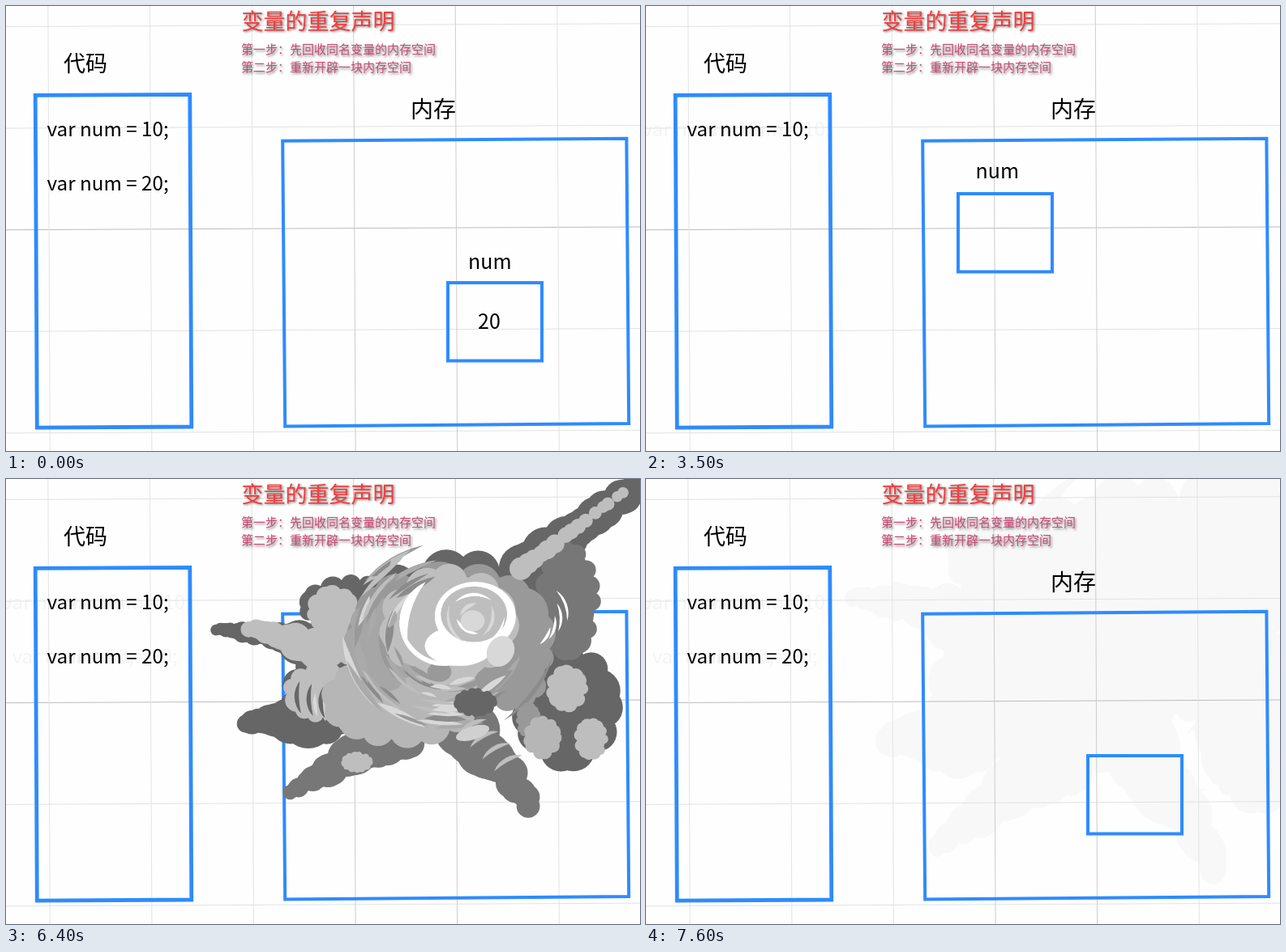
Animation, 782 px wide and 550 px high, one loop 8 s. Source, as an HTML page with a canvas:

```html
<!DOCTYPE html>
<html lang="zh">
<head>
<meta charset="utf-8">
<title>变量的重复声明</title>
<style>
html, body { margin: 0; width: 100%; height: 100%; overflow: hidden; background: #fefefe; }
canvas { display: block; }
</style>
</head>
<body>
<canvas id="stage" width="782" height="550"></canvas>
<script>
const ctx = document.getElementById('stage').getContext('2d');
const LOOP = 8000, STEP = 100, TAU = Math.PI * 2;
const FONT = '"Noto Sans CJK SC", "Noto Sans CJK", "Noto Sans", sans-serif';
const BLUE = '#2e8bff';
const DARK = '#666666', SHADE = '#777777', MID = '#999999', LIGHT = '#bebebe', PALE = '#d8d8d8', WHITE = '#ffffff';
let tint = null; // overrides fill colours when drawing a silhouette

const easeOut = p => 1 - (1 - p) ** 3;
const clamp = p => Math.max(0, Math.min(1, p));
const mix = (a, b, p) => a + (b - a) * p;

function seeded(seed) {
  return () => {
    seed = (seed * 16807) % 2147483647;
    return seed / 2147483647;
  };
}

function text(str, x, y, size, color = '#000') {
  ctx.font = `${size}px ${FONT}`;
  ctx.fillStyle = color;
  ctx.fillText(str, x, y);
}

function line(x1, y1, x2, y2, color) {
  ctx.strokeStyle = color;
  ctx.lineWidth = 1;
  ctx.beginPath();
  ctx.moveTo(x1, y1);
  ctx.lineTo(x2, y2);
  ctx.stroke();
}

function frame(corners, width) {
  ctx.beginPath();
  for (const [x, y] of corners) ctx.lineTo(x, y);
  ctx.closePath();
  ctx.strokeStyle = BLUE;
  ctx.lineWidth = width;
  ctx.stroke();
}

function around(x, y, sx, sy, draw) {
  ctx.save();
  ctx.translate(x, y);
  ctx.scale(sx, sy);
  ctx.translate(-x, -y);
  draw();
  ctx.restore();
}

function oval(color, x, y, rx, ry = rx, turn = 0) {
  ctx.beginPath();
  ctx.ellipse(x, y, rx, ry, turn, 0, TAU);
  ctx.fillStyle = tint || color;
  ctx.fill();
}

// Ellipse with a scalloped rim
function puff(color, x, y, rx, ry, seed = 7) {
  const rnd = seeded(seed * 991), size = Math.min(rx, ry) * .36;
  const n = Math.round((rx + ry) / size * 1.9);
  oval(color, x, y, rx - size * .5, ry - size * .5);
  for (let i = 0; i < n; i++) {
    const a = (i + rnd() * .5) / n * TAU, r = size * (.75 + rnd() * .35);
    oval(color, x + Math.cos(a) * (rx - r), y + Math.sin(a) * (ry - r), r);
  }
}

// Knobbly limb that widens from its tip to its root
function limb(color, x0, y0, r0, x1, y1, r1, seed = 3) {
  const rnd = seeded(seed * 733), n = 14;
  for (let i = 0; i <= n; i++) {
    const p = i / n, r = mix(r0, r1, p), sway = (rnd() - .5) * r * .45;
    oval(color, mix(x0, x1, p) + sway, mix(y0, y1, p) - sway, r * (.88 + rnd() * .2));
  }
}

// Tapered sliver along the outside of a circle
function crescent(color, x, y, r, from, to, thick) {
  const mid = (from + to) / 2, k = r / Math.cos((to - from) / 2) - thick * 2;
  ctx.beginPath();
  ctx.arc(x, y, r, from, to);
  ctx.quadraticCurveTo(x + Math.cos(mid) * k, y + Math.sin(mid) * k,
    x + Math.cos(from) * r, y + Math.sin(from) * r);
  ctx.fillStyle = tint || color;
  ctx.fill();
}

function cloudArms() {
  limb(DARK, 238, 152, 9, 300, 160, 15);
  limb(DARK, 300, 158, 15, 400, 180, 34);
  limb(DARK, 284, 292, 15, 390, 286, 40, 5);
  limb(DARK, 880, -70, 22, 700, 60, 36, 8);
  limb(SHADE, 350, 396, 11, 440, 344, 30, 4);
  limb(SHADE, 440, 340, 28, 528, 326, 20, 6);
  limb(SHADE, 709, 416, 17, 610, 300, 42, 9);
  puff(DARK, 395, 255, 62, 72);
  puff(DARK, 440, 118, 80, 48, 4);
  puff(DARK, 600, 142, 165, 110, 2);
  puff(DARK, 764, 270, 84, 98, 5);
  puff(SHADE, 765, 110, 50, 90, 6);
}

function cloudBody() {
  limb(LIGHT, 288, 150, 13, 400, 184, 28);
  puff(LIGHT, 412, 124, 40, 38, 3);
  puff(LIGHT, 430, 172, 48, 34, 5);
  puff(LIGHT, 398, 248, 62, 46, 8);
  for (let i = 0; i < 5; i++) {
    crescent(DARK, 392 + i * 18, 254 + i * 4, 38, 2.4, 3.8, 8);
    crescent(PALE, 416 + i * 12, 264 + i * 7, 34, 2.5, 3.6, 6);
  }
  puff(MID, 590, 158, 157, 108, 4);
  puff(MID, 682, 195, 62, 82, 6);
  puff('#b6b6b6', 515, 260, 122, 72, 9);
  puff('#a6a6a6', 486, 176, 58, 72, 3);
  puff(LIGHT, 586, 146, 106, 92, 5);
}

function swirls() {
  const rnd = seeded(4242), shades = ['#8c8c8c', PALE, '#aaaaaa', MID, LIGHT];
  around(585, 165, 1, .92, () => {
    for (let i = 0; i < 60; i++) {
      const a = mix(.1, 3.9, rnd()), span = .25 + rnd() * .55;
      crescent(shades[i % 5], 585, 165, mix(160, 72, i / 60), a, a + span, 5 + rnd() * 8);
    }
  });
  oval(MID, 572, 217, 18, 15);
  puff(DARK, 626, 263, 33, 22);
}

function cloudCore() {
  crescent(WHITE, 578, 142, 66, 1.1, 3.2, 24);
  crescent(WHITE, 578, 142, 66, 2.5, 4.3, 22);
  oval(WHITE, 626, 133, 61, 52);
  oval(WHITE, 602, 178, 52, 30);
  oval(LIGHT, 624, 130, 50, 42);
  for (let i = 0; i < 6; i++) {
    const a = i * 1.9;
    crescent(i % 2 ? PALE : WHITE, 624, 134, 46 - i * 5, a, a + 1.7, 8);
  }
  oval(PALE, 622, 140, 18, 16);
  oval(PALE, 664, 186, 20, 24, .5);
}

function cloudLights() {
  limb(LIGHT, 850, -55, 8, 692, 64, 16, 2);
  for (let i = 0; i < 4; i++) {
    crescent(WHITE, 726 - i * 4, 128 + i * 8, 40 - i * 5, -1 + i * .3, .3 + i * .3, 5);
    crescent(LIGHT, 690 - i * 18, 380 - i * 18, 38, 3.5, 4.9, 8);
  }
  puff(LIGHT, 764, 242, 32, 36, 3);
  puff(MID, 706, 290, 19, 27, 4);
  puff('#b6b6b6', 727, 316, 29, 33, 5);
  puff(LIGHT, 800, 318, 26, 32, 6);
  puff(LIGHT, 448, 353, 24, 16, 7);
  oval('#d0d0d0', 622, 309, 26, 10, -.3);
}

function cloud() {
  cloudArms();
  cloudBody();
  swirls();
  cloudLights();
  cloudCore();
}

// The cloud swells out of the first memory cell
const swell = (sx, sy = sx) => around(364, 336, sx, sy, cloud);

function flames() {
  ctx.fillStyle = '#eeeeee';
  for (let i = 0; i < 4; i++) {
    const x = 384 + i * 29, y = 240 - i * 3;
    ctx.beginPath();
    ctx.moveTo(x, y);
    ctx.quadraticCurveTo(x - 6, y - 22, x + 9, y - 48);
    ctx.quadraticCurveTo(x + 5, y - 25, x + 20, y);
    ctx.fill();
  }
}

function burst() {
  const cx = 555, cy = 204;
  puff(MID, 512, 214, 52, 49, 3);
  puff(MID, 598, 204, 54, 55, 5);
  puff('#b0b0b0', 562, 184, 72, 36, 4);
  puff('#8c8c8c', 505, 190, 24, 19);
  puff(PALE, 540, 213, 48, 18, 6);
  ctx.fillStyle = '#eeeeee';
  for (let i = 0; i < 12; i++) {
    const a = .7 + i * TAU / 12, far = i % 3 ? 92 : 128;
    ctx.beginPath();
    for (const [turn, r] of [[-1.57, 6], [0, far], [1.57, 6]]) {
      ctx.lineTo(cx + Math.cos(a + turn) * r, cy + Math.sin(a + turn) * r);
    }
    ctx.fill();
  }
  oval('#eeeeee', cx, cy - 4, 13, 17);
}

function streak() {
  ctx.fillStyle = '#fafafa';
  ctx.fillRect(205, 185, 157, 14);
  ctx.fillRect(405, 190, 56, 13);
}

function haze() {
  tint = '#f8f8f8';
  around(580, 180, .95, 1.25, cloud);
  tint = null;
}

function blast(t) {
  if (t >= 7200) return;
  if (t >= 6900) {
    swell(mix(.7, 1, (t - 6900) / 200));
  } else if (t >= 6700) {
    const s = t < 6800 ? 1 : 1.6;
    if (t < 6800) streak();
    around(555, 205, s, s, burst);
  } else if (t >= 6200) {
    const p = (t - 6200) / 400;
    ctx.globalAlpha = t < 6600 ? 1 : .5;
    swell(mix(.6, 1.04, p));
    ctx.globalAlpha = 1;
  } else if (t >= 5900) {
    const s = t < 6000 ? .6 : 1;
    around(428, 282, s, s, () => {
      flames();
      swell(.357, .385);
    });
  }
}

function bounceIn(p) {
  const keys = [[0, -3000], [.6, 25], [.75, -10], [.9, 5], [1, 0]];
  const i = Math.max(1, keys.findIndex(key => p <= key[0]));
  const [t0, a] = keys[i - 1], [t1, b] = keys[i];
  return mix(a, b, easeOut((p - t0) / (t1 - t0)));
}

function slideText(t, start, side, str, x, y, size) {
  if (t <= start) return;
  text(str, x + side * bounceIn(clamp((t - start) / 700)), y, size);
}

function zoomIn(t, start, x, y, draw) {
  const p = clamp((t - start) / 500);
  if (!p) return;
  const s = mix(.3, 1, 1 - (1 - p) ** 2);
  ctx.globalAlpha = Math.min(1, p * 2);
  around(x, y, s, s, draw);
  ctx.globalAlpha = 1;
}

function cell(x, y) {
  ctx.strokeStyle = BLUE;
  ctx.lineWidth = 4;
  ctx.strokeRect(x, y, 116, 96.5);
}

function grid() {
  for (let i = 0; i < 5; i++) {
    const y = 25.5 + i * 125.6;
    line(0, y, 782, y - 3.7, i === 2 ? '#bcbcbc' : '#e2e2e2');
  }
  for (let i = 0; i < 6; i++) {
    const x = 51.8 + i * 125.6;
    line(x, 0, x + 2.5, 550, i === 3 || i === 4 ? '#cccccc' : '#e4e4e4');
  }
}

function headings() {
  ctx.shadowColor = 'rgba(0,0,0,.5)';
  ctx.shadowBlur = 3;
  ctx.shadowOffsetX = ctx.shadowOffsetY = 1.5;
  text('变量的重复声明', 290.5, 28.7, 27, '#f23c3c');
  text('第一步：先回收同名变量的内存空间', 290, 59, 15, '#cb4a78');
  text('第二步：重新开辟一块内存空间', 290, 81, 15, '#cb4a78');
  ctx.shadowColor = 'transparent';
}

function board() {
  grid();
  text('代码', 71, 81, 27);
  text('内存', 499, 137.5, 28);
  frame([[36.2, 110.3], [226.8, 109.4], [228.8, 520], [38.3, 521.2]], 4.8);
  frame([[341.2, 166.8], [765.4, 163.7], [768.2, 516], [344.2, 519.4]], 4);
}

// Pale after-image left where the sliding code bounced
function trail(str, y, ...shifts) {
  for (const dx of shifts) text(str, 50.5 + dx, y, 24.2, '#f4f4f4');
}

function render(t) {
  const codeA = ['var num = 10;', 50.5, 161, 24.2];
  const codeB = ['var num = 20;', 50.5, 228, 24.2];
  ctx.fillStyle = '#fefefe';
  ctx.fillRect(0, 0, 782, 550);
  if (t >= 6700) haze();
  if (t >= 2000) trail(codeA[0], 161, -55, 27);
  if (t >= 5700) trail(codeB[0], 228, -43, 11);
  board();

  if (t < 1200) {
    text(...codeA);
    text(...codeB);
    text('num', 570, 325, 25);
    cell(545, 342);
    text('20', 582, 398.5, 25);
  } else {
    slideText(t, 1300, 1, ...codeA);
    slideText(t, 5000, 1, ...codeB);
    const label = () => slideText(t, 1900, -1, 'num', 406.5, 212.5, 25);
    if (t < 6200) {
      zoomIn(t, 3000, 443, 280, () => cell(385, 232));
      blast(t);
      label();
      zoomIn(t, 3900, 426, 273, () => text('10', 411.5, 281.5, 25));
    } else {
      if (t < 6800) label();
      blast(t);
      zoomIn(t, 7100, 603, 390, () => cell(545, 342));
    }
  }
  headings();
}

function tick(now) {
  render(Math.floor(now % LOOP / STEP) * STEP);
  requestAnimationFrame(tick);
}
requestAnimationFrame(tick);
</script>
</body>
</html>
```
